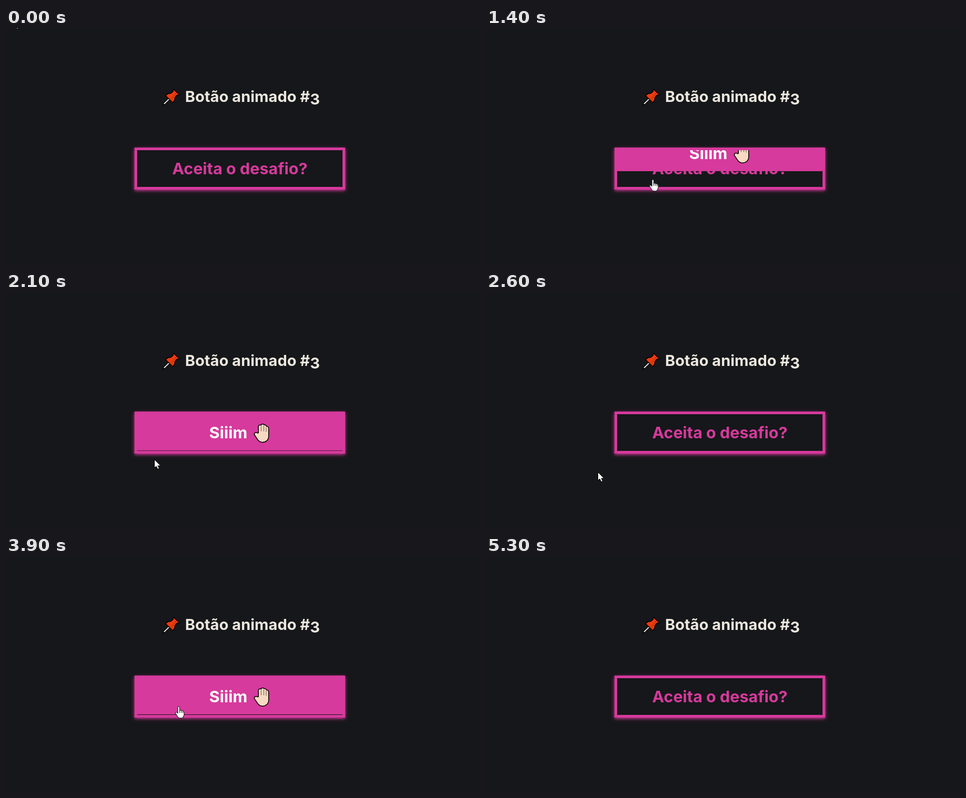
Write an HTML page that moves like this. It is 900 px wide and 450 px high and loops after 5.9 s.

```html
<!DOCTYPE html>
<html lang="pt-BR">
<head>
<meta charset="utf-8">
<title>Botão animado</title>
<style>
  :root { --bg: #16171a; --pink: #d63a9c; }
  html, body { margin: 0; width: 100%; height: 100%; overflow: hidden; background: var(--bg); }
  .stage { position: relative; width: 900px; height: 450px; overflow: hidden; }
  .frame {
    position: absolute; left: 244px; top: 228px; width: 400px; height: 80px;
    box-sizing: border-box; border: 5px solid var(--pink);
    box-shadow: 0 2px 6px var(--pink);
  }
  svg { position: absolute; inset: 0; }
  text { font: 700 30.5px Inter, "Open Sans", sans-serif; text-anchor: middle; }
  .title { font-size: 29px; fill: #ece8df; }
  .label, .cover rect { fill: var(--pink); }
  .ink { stroke: #000; stroke-width: 3; stroke-linejoin: round; paint-order: stroke; }
  .cursor path { fill: #fff; stroke: #000; stroke-linejoin: round; }
</style>
</head>
<body>
<div class="stage">
  <div class="frame"></div>
  <svg width="900" height="450" viewBox="0 0 900 450">
    <clipPath id="inside"><rect x="249" y="233" width="390" height="70"/></clipPath>

    <g class="pin">
      <path d="M299.5 145.5L311 134" stroke="#000" stroke-width="5" stroke-linecap="round"/>
      <path d="M300 145L311 134" stroke="#e8e8e8" stroke-width="2"/>
      <path class="ink" fill="#ee3a14" d="M318 118L328 127 323.5 127.5 320 132.5 319.5 137 316.5 141 304 129 308 126 313 125.5 318 121.5Z"/>
      <path fill="#da3a05" d="M323 122.5L328 127 323.5 127.5 320 132.5 319.5 137 316.5 141 310 135Z"/>
    </g>
    <text class="title" x="468" y="141">Botão animado #<tspan dy="5">3</tspan></text>
    <text class="label" x="444" y="279">Aceita o desafio?</text>

    <g clip-path="url(#inside)">
      <g id="cover" class="cover">
        <rect x="249" y="233" width="390" height="70"/>
        <text x="422" y="280" fill="#fff">Siiim</text>
        <path class="ink" fill="#f8dac3" d="M480 270V258q0-3 2.2-3 1.4 0 2.3 1 .4-2.7 2.7-2.7 2 0 2.5 1.6 3.6-1 4.1 2.6 3.9-.6 4.2 3.4V275q0 5.5-3 8.500-3.500 3-8 3-4.500 0-8-4l-6.500-9.500q-1-2.300 1-3.300 2-.7 4 .8Z"/>
        <path fill="none" stroke="#8d6a58" stroke-width="1.3" stroke-linecap="round" d="M484.5 257V266M489.5 256V266M494 259V267"/>
      </g>
    </g>

    <g id="cursor" class="cursor">
      <path id="arrow" d="M.5.5V16.5L4 13.200 6.700 18.800 9.500 17.500 7 12.200H12Z"/>
      <g id="hand">
        <path d="M-1.800 13V1.800a1.800 1.800 0 0 1 3.600 0V8a1.700 1.700 0 0 1 3.200.4 1.700 1.700 0 0 1 3 .8 1.500 1.500 0 0 1 2.200 1.300V14.500q0 2-1.200 4-.8 3.500-3.500 3.500H1.500q-2 0-3.500-2.500L-5.800 13.200q-1.200-2 .6-2.400 1.400-.2 3.400 2.200Z"/>
        <path d="M1.800 8V12M5 8.600V12M8 9.500V12.500"/>
      </g>
    </g>
  </svg>
</div>
<script>
  const LOOP = 5900, TICK = 100, SLIDE = 500, HEIGHT = 70;
  const $ = id => document.getElementById(id);

  // When the pointer enters and leaves the button
  const visits = [[1235, 2090], [3480, 4530]];

  const key = (time, x, y, easing = 'linear') =>
    ({ offset: time / LOOP, transform: `translate(${x}px, ${y}px)`, easing });

  function track(id, keys) {
    const anim = $(id).animate(keys, { duration: LOOP, fill: 'both' });
    anim.pause();
    return anim;
  }

  const cover = track('cover', [
    key(0, 0, -HEIGHT),
    ...visits.flatMap(([enter, leave]) => [
      key(enter, 0, -HEIGHT, 'ease'),
      key(enter + SLIDE, 0, 0),
      key(leave, 0, 0, 'ease'),
      key(leave + SLIDE, 0, -HEIGHT)
    ]),
    key(LOOP, 0, -HEIGHT)
  ]);

  // Turning points and rests of the pointer; it ends above the stage
  const cursor = track('cursor', [
    key(0, 14, -17),
    key(100, 14, -17),
    key(700, 174, 328, 'ease-out'),
    key(1000, 268, 347, 'ease-out'),
    key(1500, 320, 285),
    key(1900, 320, 285),
    key(2200, 262, 336, 'ease-out'),
    key(2600, 212, 343),
    key(2800, 212, 343, 'ease-in-out'),
    key(3400, 317, 319, 'ease-out'),
    key(3900, 328, 287),
    key(4100, 328, 287, 'ease-in'),
    key(4700, 264, 342),
    key(4800, 245, 346),
    key(5300, 104, -20),
    key(LOOP, 104, -20)
  ]);

  function show(time) {
    const t = Math.floor(time % LOOP / TICK) * TICK;
    const hover = visits.some(([enter, leave]) => t >= enter && t < leave);
    cover.currentTime = cursor.currentTime = t;
    $('hand').style.display = hover ? '' : 'none';
    $('arrow').style.display = hover ? 'none' : '';
  }

  let start;
  function loop(now) {
    start ??= now;
    show(now - start);
    requestAnimationFrame(loop);
  }
  show(0);
  requestAnimationFrame(loop);
</script>
</body>
</html>
```
